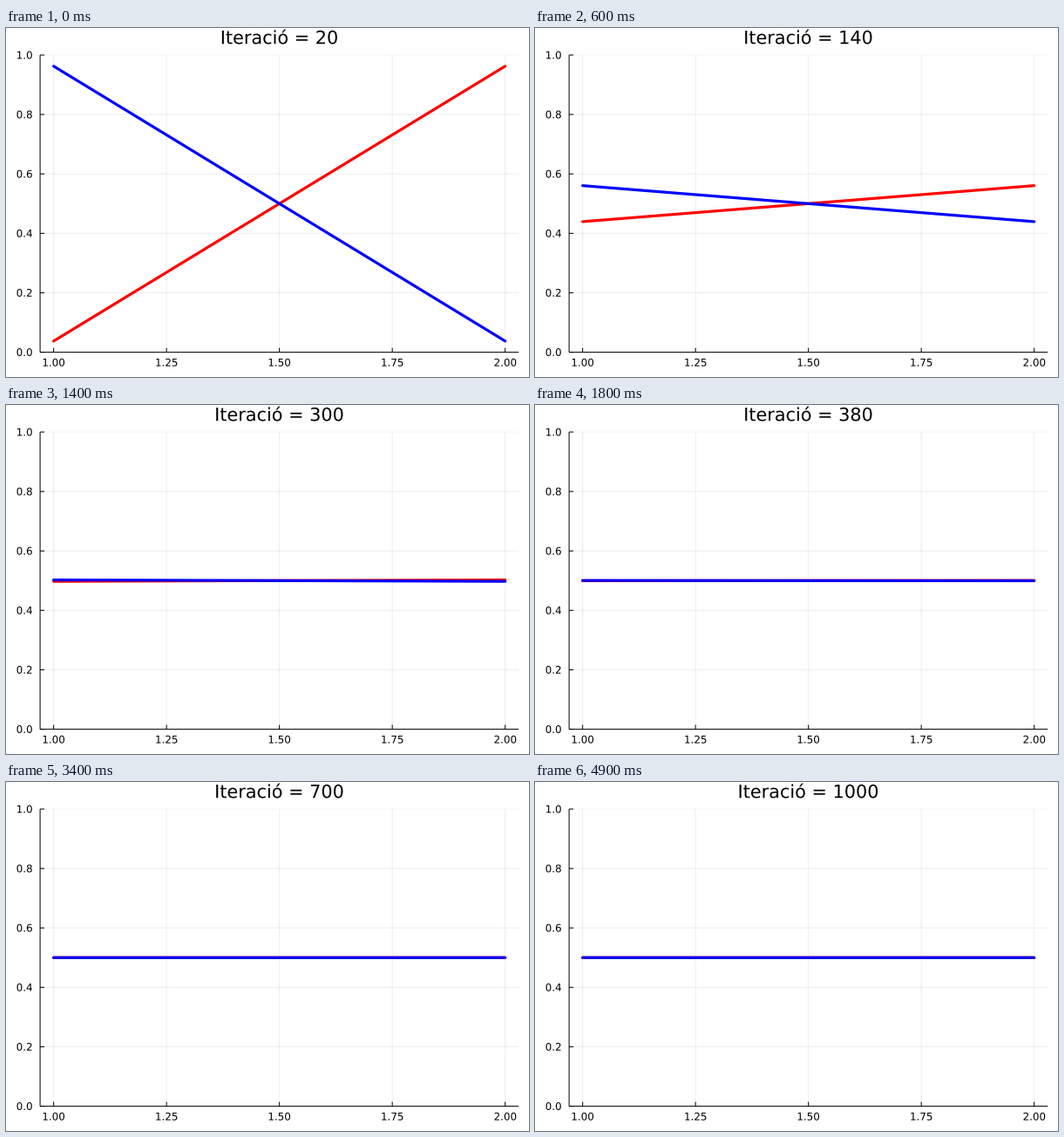
Recreate the animation shown at these times as a matplotlib script. Size 600 px wide and 400 px high, loop 5000 ms.

```python
import math

import matplotlib.pyplot as plt
from matplotlib.animation import FuncAnimation
from matplotlib.patches import PathPatch
from matplotlib.textpath import TextPath
from matplotlib.transforms import Affine2D

WIDTH, HEIGHT, DPI = 600, 400, 100
LEFT, RIGHT, TOP, BOTTOM = 39.1, 588.2, 31.0, 371.6
X_MIN, X_MAX = 0.97, 2.03
FRAMES, INTERVAL, STEP = 50, 100, 20
RATE = 0.02
TICK = 5
LABEL_SIZE, TITLE_SIZE = 11.9, 20.8

fig = plt.figure(figsize=(WIDTH / DPI, HEIGHT / DPI), dpi=DPI, facecolor="white")
ax = fig.add_axes([0, 0, 1, 1])
ax.set(xlim=(0, WIDTH), ylim=(HEIGHT, 0))
ax.axis("off")


def px(x):
    return LEFT + (x - X_MIN) / (X_MAX - X_MIN) * (RIGHT - LEFT)


def py(y):
    return BOTTOM - y * (BOTTOM - TOP)


def stroke(xs, ys, color="black", width=1.0, **style):
    line, = ax.plot(xs, ys, color=color, lw=width * 72 / DPI, snap=False, **style)
    return line


def glyphs(text, size):
    return TextPath((0, 0), text, size=size, prop={"family": "DejaVu Sans"})


def place(path, x, baseline, centered=False):
    """Return a transform putting a text path at stage pixels."""
    if centered:
        box = path.get_extents()
        x -= (box.x0 + box.x1) / 2
    return Affine2D().scale(1, -1).translate(x, baseline) + ax.transData


def label(text, size, x, baseline, centered=False):
    path = glyphs(text, size)
    patch = PathPatch(path, facecolor="black", lw=0, snap=False,
                      transform=place(path, x, baseline, centered))
    ax.add_artist(patch)
    return patch


x_ticks = [1 + i / 4 for i in range(5)]
y_ticks = [i / 5 for i in range(6)]

for x in x_ticks:
    stroke([px(x)] * 2, [TOP, BOTTOM], alpha=0.07, solid_capstyle="butt")
for y in y_ticks:
    stroke([LEFT, RIGHT], [py(y)] * 2, alpha=0.035 if y == 1 else 0.07,
           solid_capstyle="butt")

stroke([LEFT, RIGHT], [BOTTOM] * 2, solid_capstyle="butt")
stroke([LEFT] * 2, [TOP, BOTTOM], solid_capstyle="butt")
for x in x_ticks:
    stroke([px(x)] * 2, [BOTTOM, BOTTOM - TICK], solid_capstyle="butt")
    label(f"{x:.2f}", LABEL_SIZE, px(x) + 0.2, 387.6, centered=True)
for y in y_ticks:
    stroke([LEFT, LEFT + TICK], [py(y)] * 2, solid_capstyle="butt")
    label(f"{y:.1f}", LABEL_SIZE, 11.7, py(y) + 4.3)

ends = [px(1), px(2)]
red = stroke(ends, [0, 0], "red", 3.2, solid_capstyle="round", zorder=3)
blue = stroke(ends, [0, 0], "blue", 3.2, solid_capstyle="round", zorder=4)
title = label("Iteració", TITLE_SIZE, 0, 0)


def update(frame):
    iteration = STEP * (frame + 1)
    gap = 0.5 / math.cosh(RATE * iteration)
    low, high = py(0.5 - gap), py(0.5 + gap)
    red.set_ydata([low, high])
    blue.set_ydata([high, low])
    path = glyphs(f"Iteració = {iteration}", TITLE_SIZE)
    title.set_path(path)
    title.set_transform(place(path, (LEFT + RIGHT) / 2 + 0.2, 18.2, centered=True))
    return red, blue, title


anim = FuncAnimation(fig, update, frames=FRAMES, interval=INTERVAL,
                     init_func=lambda: update(0), repeat=True, repeat_delay=0)
plt.show()
```
